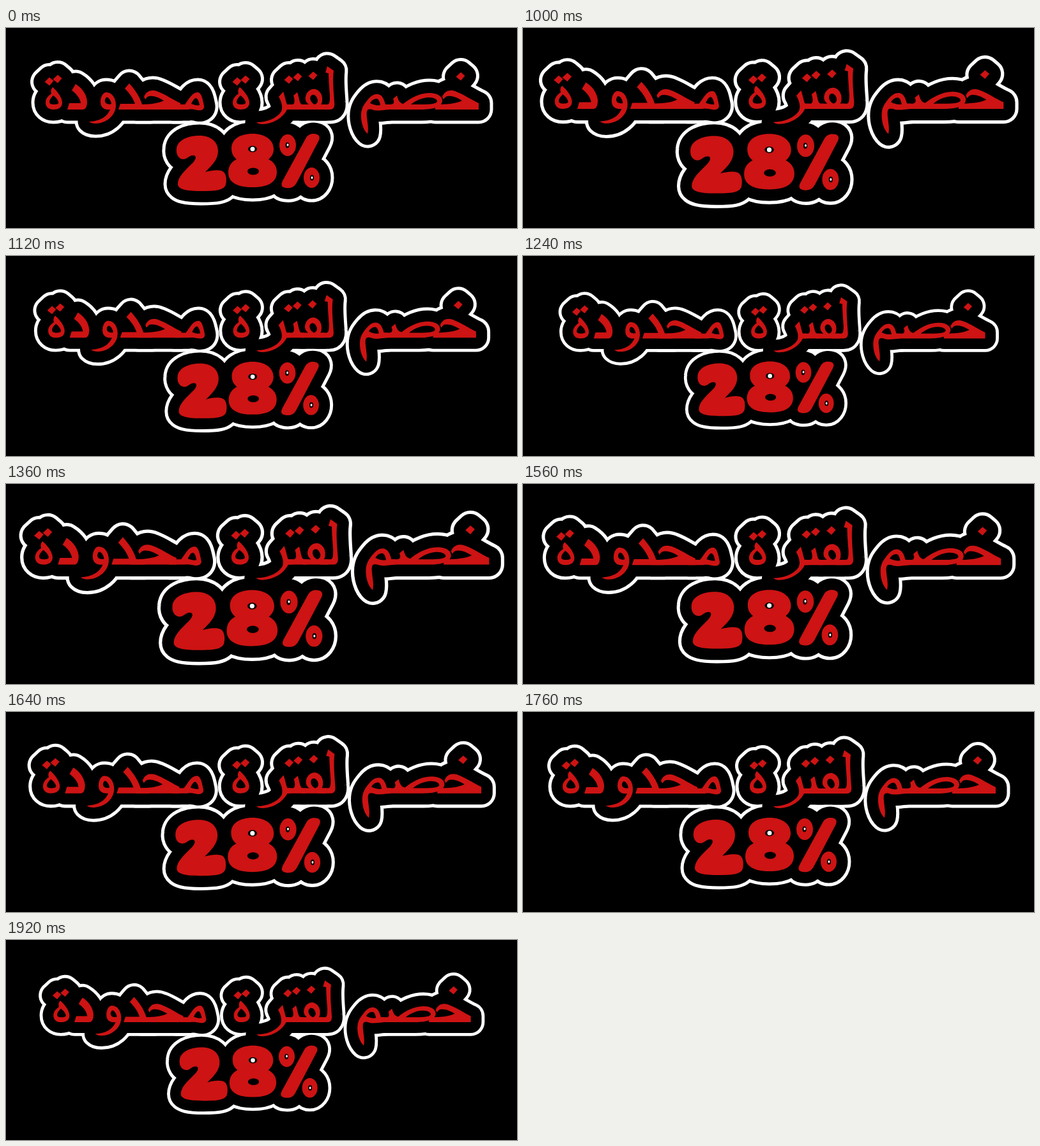
Recreate the animation shown at these times as an HTML page with a canvas. Size 800 by 314 pixels, loop 1960 ms.

```html
<!DOCTYPE html>
<html lang="ar">
<head>
<meta charset="utf-8">
<style>
  html, body { margin: 0; height: 100%; overflow: hidden; background: #000; }
  canvas { display: block; }
</style>
</head>
<body>
<canvas id="stage" width="800" height="314" role="img" aria-label="خصم لفترة محدودة 28%">خصم لفترة محدودة 28%</canvas>
<script>
const ctx = document.getElementById('stage').getContext('2d');
const LOOP = 1960, HOLD = 1000, STEP = 40, SIZE_STEP = 0.0121;

// Size jitter after the hold, in steps away from normal size
const jitter = [3, -2, 5, -1, 2, -3, -4, 1, -2, 4, -1, 2, -4, 2, 2, -2, 1, 4, -1, 0, 3, -2, 1, -3];

const moved = (path, dx) => {
  const copy = new Path2D();
  copy.addPath(path, { e: dx });
  return copy;
};
const dot = (x, y) => new Path2D(`M${x + 1} ${y - 6.5}l6.5 5.5-6.5 7.5-7.5-6z`);
const oval = (x, y, rx, ry) => `M${x - rx} ${y}a${rx} ${ry} 0 1 1 ${2 * rx} 0a${rx} ${ry} 0 1 1 ${-2 * rx} 0z`;

const hah = new Path2D('M683 108C687 98 696 96 705 100C718 105 727 112 740 118V128H672V120C690 120 704 119 714 114C706 109 698 106 692 107C689 107 687 109 685 112Z');
const tehMarbuta = new Path2D('M366 93C371 97 381 108 381 117C381 125 375 128 367 128C360 128 355 124 355 117C355 110 360 106 364 103C363 100 363 96 366 93ZM367 106C363 110 361 113 361 116C361 119 364 120 368 120C373 120 376 119 375 116C374 112 370 108 367 106Z');
const sad = new Path2D('M606 111L612 106C614 113 616 118 622 119C632 111 647 102 663 102C675 102 683 107 683 114C683 124 668 128 650 128H588V120H602C608 120 608 116 606 111ZM634 120C641 114 652 109 662 109C670 109 675 112 675 115C675 119 664 120 652 120Z');
const meemEnd = new Path2D('M600 128C588 129 580 131 573 128C565 126 564 130 565 140C566 150 568 158 566 166C559 160 555 146 556 134C557 124 562 118 567 112C572 106 577 103 583 104C590 106 592 113 594 120H600ZM570 118C576 121 582 122 586 121C585 115 583 111 580 111C576 111 572 114 570 118Z');
const lam = new Path2D('M500 70L503 60L513 67C511 82 513 100 514 116C515 124 513 128 507 128H488V120H503C507 120 507 114 507 106C506 92 505 80 505 71Z');
const feh = new Path2D('M500 128H462V120H474C470 117 468 113 469 108C471 99 478 95 484 96C492 98 496 106 495 114C495 117 494 119 493 120H500ZM483 120C488 119 489 114 487 110C485 105 480 103 477 107C475 111 477 117 483 120Z');
const teh = new Path2D('M468 128H436V120H448C453 120 452 112 450 106L456 101C459 108 459 120 464 120H468Z');
const reh = new Path2D('M427 108L434 100C437 108 438 116 440 120H446V128H440C434 140 420 150 402 151C397 151 394 150 392 148C408 148 424 142 431 131C434 124 431 115 427 108Z');
const meemStart = new Path2D('M262 128V120H280C286 113 291 101 300 101C306 101 308 112 310 122C311 128 306 130 300 129C295 128 290 127 285 128ZM290 119C295 121 300 122 303 121C302 115 300 110 297 110C294 111 292 115 290 119Z');
const dalEnd = new Path2D('M186 95L193 87C202 97 209 107 213 120H226V128H176L179 119H202C199 110 193 102 186 95Z');
const waw = new Path2D('M157 101C166 101 172 110 172 121C172 138 156 150 140 150C136 150 132 149 130 147C147 146 158 140 163 128C154 129 148 125 148 116C148 108 152 101 157 101ZM157 109C154 112 154 117 158 119C161 120 164 120 165 119C164 113 160 108 157 109Z');
const dal = new Path2D('M103 98L109 88C119 94 126 104 127 115C127 123 125 128 120 128H96L99 118H117C116 110 110 103 103 98Z');

const two = new Path2D('M267 190C268 176 285 169 303 169C321 169 332 179 332 193C332 207 322 216 312 226C319 224 330 222 337 224C345 226 346 238 344 246C341 255 328 256 306 256C285 256 269 254 269 245C269 234 279 225 290 214C298 207 299 200 293 200C286 200 284 206 278 206C270 206 266 198 267 190Z');
const eight = new Path2D('M386 166C406 166 419 176 419 190C419 197 416 202 411 206C419 210 424 217 424 226C424 243 409 250 386 250C363 250 348 243 348 227C348 217 353 210 361 206C356 202 353 197 353 189C353 175 366 166 386 166Z' + oval(386, 190, 7, 5) + oval(387, 225, 9, 5.5));
const slash = new Path2D('M470 172C474 166 481 165 487 167C491 169 492 172 489 178L455 243C451 250 446 252 438 251C431 250 430 246 433 240Z');
const ringTop = new Path2D(oval(441, 184, 13, 17) + oval(440.5, 184, 3, 4.5));
const ringBottom = new Path2D(oval(478.5, 235, 12.5, 16) + oval(479, 235, 3, 4.5));

const shapes = [
  hah, dot(711, 76), sad, meemEnd,
  lam, feh, dot(480, 75), teh, dot(442, 81), dot(456, 77), reh,
  tehMarbuta, dot(361, 84), dot(374, 81),
  meemStart, moved(hah, -467), dalEnd, waw, dal,
  moved(tehMarbuta, -293), dot(67, 84), dot(80, 80),
  two, eight, slash, ringTop, ringBottom
];
const glints = new Path2D(oval(386, 190, 3.5, 3.5) + oval(441, 183.5, 1.5, 2) + oval(479, 235, 1.5, 2));

// Solid silhouette widened on every side; counters are covered too
function backing(color, width) {
  ctx.strokeStyle = ctx.fillStyle = color;
  ctx.lineWidth = width;
  for (const shape of shapes) {
    ctx.fill(shape);
    ctx.stroke(shape);
  }
}

function draw(now) {
  const t = now % LOOP;
  const size = t < HOLD ? 0 : jitter[Math.floor((t - HOLD) / STEP)];
  const scale = 1 + size * SIZE_STEP;

  ctx.resetTransform();
  ctx.fillStyle = '#000';
  ctx.fillRect(0, 0, 800, 314);
  ctx.translate(400, 157);
  ctx.scale(scale, scale);
  ctx.translate(-400, -157);

  ctx.lineJoin = 'round';
  backing('#fff', 45);
  backing('#000', 35);
  ctx.fillStyle = '#cd1313';
  shapes.forEach(shape => ctx.fill(shape, 'evenodd'));
  ctx.fillStyle = '#fff';
  ctx.fill(glints);
  requestAnimationFrame(draw);
}
requestAnimationFrame(draw);
</script>
</body>
</html>
```
